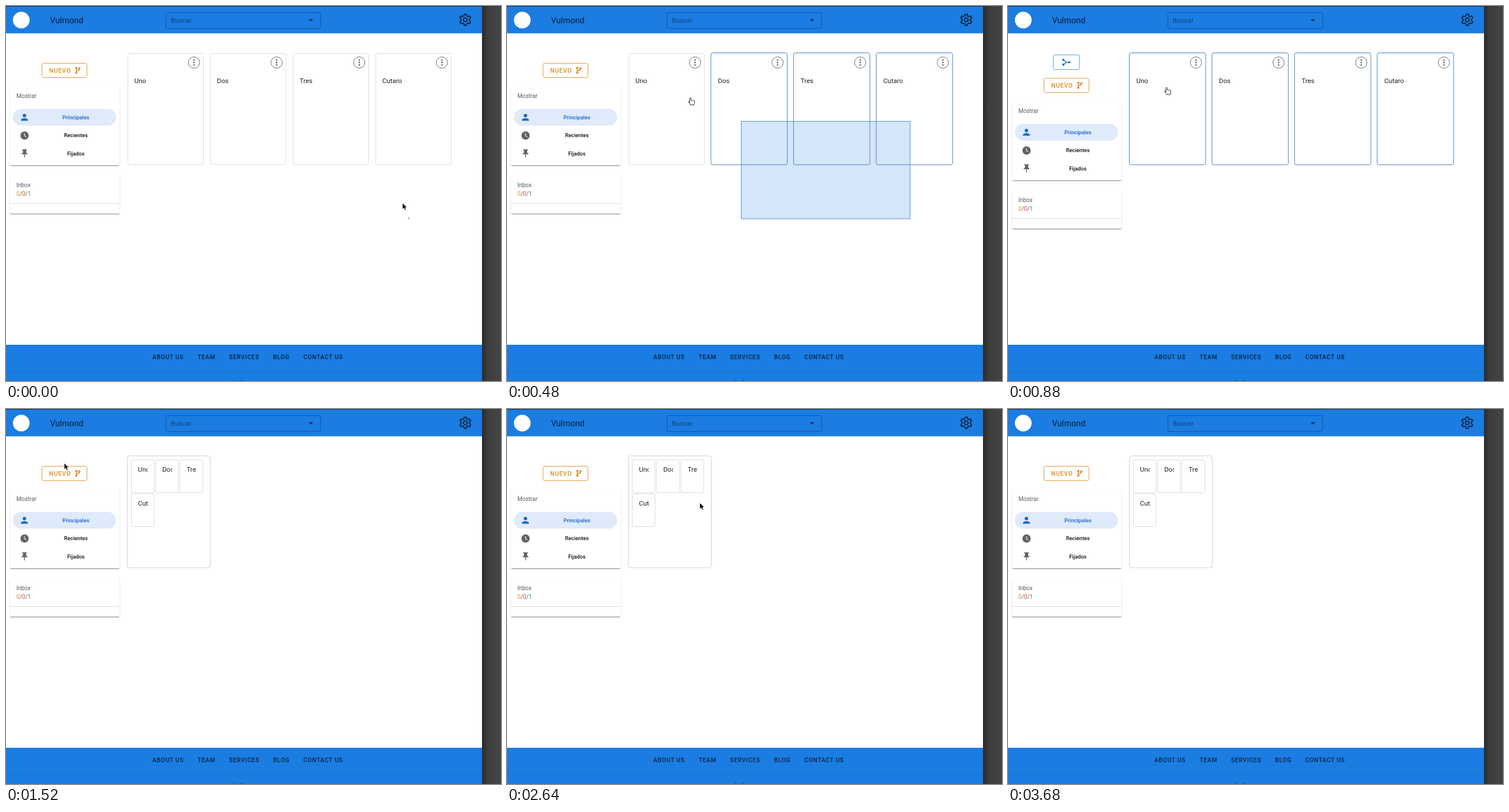
An HTML page that plays this animation: 859x652 px, repeating every 3760 ms.

```html
<!DOCTYPE html>
<html lang="es">
<head>
<meta charset="utf-8">
<title>Vulmond</title>
<style>
html, body { margin: 0; width: 859px; height: 652px; overflow: hidden; background: #fff; }
svg { position: absolute; left: 0; top: 0; font-family: Roboto, sans-serif; }
.paper { position: absolute; left: 6.5px; width: 190px; background: #fff; border-radius: 2px;
  box-shadow: 0 2px 1px -1px rgba(0,0,0,.28), 0 1px 1px rgba(0,0,0,.18), 0 1px 3px rgba(0,0,0,.14); }
#side { position: absolute; left: 0; top: 0; }
.soft { font-size: 10px; fill: #5c5c5c; }
.item { font-size: 9.3px; font-weight: 500; text-anchor: middle; fill: #111; }
.name { font-size: 11.5px; fill: #1d1d1d; }
.nav { font-size: 10.2px; font-weight: 500; letter-spacing: .8px; fill: #0c2340; }
.card { fill: #fff; stroke: #dcdcdc; }
.card.on { stroke: #4680c4; }
.kebab circle { fill: #555; }
.kebab .ring { fill: none; stroke: #686868; }
</style>
</head>
<body>
<svg width="859" height="652">
  <defs>
    <linearGradient id="edge">
      <stop offset="0" stop-color="#2b2b2b"/>
      <stop offset=".3" stop-color="#3d3d3d"/>
      <stop offset="1" stop-color="#444"/>
    </linearGradient>
  </defs>
  <rect width="826" height="47.5" fill="#1b7ce1"/>
  <rect width="826" height="1" fill="#0e2f55"/>
  <rect y="589" width="826" height="63" fill="#1b7ce1"/>
  <rect y="635" width="826" height="1" fill="#186dc6"/>
  <path d="M395 651h3M407 651h4" stroke="#12467d"/>
  <rect x="826" width="33" height="652" fill="url(#edge)"/>

  <circle cx="26.5" cy="24.5" r="14.5" fill="#fff"/>
  <text x="76.5" y="29.5" font-size="14.4" letter-spacing=".1" fill="#0a1d35">Vulmond</text>
  <rect x="277.5" y="11.5" width="268.5" height="27.5" rx="3" fill="none" stroke="#125397"/>
  <text x="286" y="29" font-size="11.3" letter-spacing=".2" fill="#103f74">Buscar</text>
  <path d="M525 23h8l-4 4.2z" fill="#0e3461"/>
  <g transform="translate(797 24) scale(1.083)" fill="none" stroke="#0c2848" stroke-width="1.9">
    <path id="gear" stroke-linejoin="round"/>
    <circle r="3"/>
  </g>
  <g id="nav" class="nav"></g>
  <g id="cards"></g>
  <g id="group">
    <rect x="210.5" y="81.5" width="144" height="194.5" rx="4" fill="#fff" stroke="#d0d0d0"/>
  </g>
  <g id="merge" fill="#1f72cc" stroke="#1f72cc">
    <rect x="78.5" y="85" width="45.5" height="25.5" rx="3" fill="none" stroke="#5b96d8"/>
    <path d="M96 93.5l5 4.3-5 4.3M101 97.8h5" fill="none" stroke-width="1.5"/>
    <g stroke="none">
      <circle cx="96" cy="93.5" r="1.9"/><circle cx="96" cy="102" r="1.9"/><circle cx="106.3" cy="97.8" r="1.9"/>
    </g>
  </g>
</svg>

<div id="side">
  <div class="paper" style="top:139px;height:138px"></div>
  <div class="paper" style="top:294px;height:67px"></div>
  <svg width="200" height="400">
    <rect x="62.5" y="99.5" width="78" height="25" rx="3" fill="none" stroke="#e09a3c"/>
    <text x="75" y="115.7" font-size="10.4" font-weight="500" letter-spacing=".75" fill="#df8a1c">NUEVO</text>
    <g fill="none" stroke="#df8a1c" stroke-width="1.5">
      <path d="M122 109v6M122 114q0-1.5 2-1.7 3.200-.3 3.200-3"/>
      <circle cx="122" cy="107.800" r="1.300"/><circle cx="122" cy="116" r="1.300"/><circle cx="127.200" cy="108.600" r="1.300"/>
    </g>
    <text class="soft" x="18" y="160">Mostrar</text>
    <rect x="12" y="179" width="179" height="29" rx="14.500" fill="#dfeafa"/>
    <path transform="translate(23 184.500) scale(.75)" fill="#1a69c6" d="M12 12a4 4 0 1 0 0-8 4 4 0 0 0 0 8zm0 2c-2.670 0-8 1.340-8 4v2h16v-2c0-2.660-5.330-4-8-4z"/>
    <circle cx="32.200" cy="225.200" r="7.200" fill="#636363"/>
    <path d="M32 221v4.500l3.200 2" fill="none" stroke="#fff" stroke-width="1.100"/>
    <path transform="translate(23.700 247.800) scale(.71)" fill="#636363" d="M16 9V4h1a1 1 0 0 0 0-2H7a1 1 0 0 0 0 2h1v5a3 3 0 0 1-3 3v2h6v7l1 1 1-1v-7h6v-2a3 3 0 0 1-3-3z"/>
    <text class="item" x="121.300" y="196.800" style="fill:#1a66c2">Principales</text>
    <text class="item" x="121.300" y="228.300">Recientes</text>
    <text class="item" x="121.300" y="260">Fijados</text>
    <text class="soft" x="18" y="315">Inbox</text>
    <text class="soft" x="18" y="329.700"><tspan fill="#dd8f22">0</tspan>/<tspan fill="#cf4a40">0</tspan>/<tspan fill="#36994b">1</tspan></text>
    <path d="M6.500 343.500h190" stroke="#dcdcdc"/>
  </svg>
</div>

<svg width="859" height="652">
  <rect id="sel" fill="#2e7de6" fill-opacity=".2" stroke="#5a8fcb"/>
  <path id="arrow" d="M0 0v11l2.600-2.300 1.900 4.100 2-.9-1.900-3.900h3.400z" fill="#000" stroke="#fff" stroke-width=".8"/>
  <path id="hand" d="M-1 8V1.100a1.100 1.100 0 0 1 2.200 0V4.600a1.200 1.200 0 0 1 2.200.2 1.200 1.200 0 0 1 2.100.5 1.100 1.100 0 0 1 2 .7v3q0 1.500-1 2.300V12.500H.2V11.300L-3 7.600a1 1 0 0 1 1.500-1.300z" fill="#fff" stroke="#222" stroke-width="1"/>
</svg>

<script>
const LOOP = 3760, STEP = 80;
const GROUPED = 1360, RELEASED = 880, HIDDEN = 3280;
const NAMES = ['Uno', 'Dos', 'Tres', 'Cutaro'];
const START = { x: 699.5, y: 370 };

// pointer path: time, x, y
const PATH = [
  [-80, 699, 368], [0, 688, 342.5], [160, 627, 298], [320, 492, 239], [400, 406.5, 200.5],
  [480, 318, 159.5], [560, 291, 148], [640, 285.5, 146], [800, 285.5, 146], [880, 275, 141.5],
  [1120, 125, 100], [1200, 101, 94], [1600, 101, 94], [1920, 220, 128], [2240, 334.5, 163]
];

const $ = id => document.getElementById(id);
const show = (el, on) => el.style.display = on ? '' : 'none';
const move = (el, x, y) => el.style.transform = `translate(${x}px, ${y}px)`;
const cardX = i => 211 + 143.4 * i;

$('gear').setAttribute('d', 'M' + Array.from({ length: 6 }, (_, i) =>
  [[-22.5, 6.6], [-10, 9.2], [10, 9.2], [22.5, 6.6]].map(([a, r]) => {
    const t = (a + i * 60) * Math.PI / 180;
    return `${(r * Math.sin(t)).toFixed(2)} ${(-r * Math.cos(t)).toFixed(2)}`;
  }).join('L')).join('L') + 'Z');

$('nav').innerHTML = [['ABOUT US', 254], ['TEAM', 332.5], ['SERVICES', 387], ['BLOG', 463.5], ['CONTACT US', 516]]
  .map(([label, x]) => `<text x="${x}" y="614.3">${label}</text>`).join('');

$('cards').innerHTML = NAMES.map((name, i) => `<g transform="translate(${cardX(i)} 82)">
  <rect class="card" rx="3"/>
  <text class="name" x="11.7" y="51.5">${name}</text>
  <g class="kebab" transform="translate(115.2 16.3)"><circle class="ring" r="9.8"/>
  <circle cy="-4.2" r="1.3"/><circle r="1.3"/><circle cy="4.2" r="1.3"/></g></g>`).join('');

$('group').innerHTML += NAMES.map((name, i) => {
  const x = 217.5 + 42.2 * (i % 3), y = i < 3 ? 88.5 : 147.5;
  return `<rect class="card" x="${x}" y="${y}" width="39.5" height="57" rx="2"/>
  <svg x="${x + 11.5}" y="${y}" width="16.8" height="57" overflow="hidden"><text class="name" y="20">${name}</text></svg>`;
}).join('');

const frames = [...document.querySelectorAll('#cards .card')];

function setBox(el, x, y, w, h) {
  Object.entries({ x, y, width: w, height: h }).forEach(([k, v]) => el.setAttribute(k, v));
}

function pointer(t) {
  const i = PATH.findIndex(p => p[0] > t);
  if (i < 0) return PATH.at(-1).slice(1);
  const [a, b] = [PATH[i - 1] || PATH[0], PATH[i]];
  const k = (t - a[0]) / (b[0] - a[0]);
  return [a[1] + (b[1] - a[1]) * k, a[2] + (b[2] - a[2]) * k];
}

function draw(now) {
  const t = Math.floor(now % LOOP / STEP) * STEP;
  const [x, y] = pointer(t);
  // the marquee trails the pointer by one step
  const [sx, sy] = pointer(Math.min(t, 800) - STEP);
  const dragging = t < RELEASED, grouped = t >= GROUPED;
  const merging = !dragging && !grouped;

  show($('sel'), dragging);
  setBox($('sel'), sx, sy, Math.max(0, START.x - sx), START.y - sy);
  show($('cards'), !grouped);
  show($('group'), grouped);
  show($('merge'), merging);
  move($('side'), 0, merging ? 26 : 0);

  frames.forEach((f, i) => {
    const on = sy < 275.5 && sx < cardX(i) + 131.5;
    f.classList.toggle('on', on);
    if (on) setBox(f, -.5, -.5, 132.5, 194.5);
    else setBox(f, .5, .5, 131, 193);
  });

  const overCard = y > 82 && y < 275 && NAMES.some((_, i) => x > cardX(i) && x < cardX(i) + 131);
  const overMerge = merging && x > 78 && x < 124 && y > 85 && y < 110;
  const inMarquee = dragging && x >= sx && y >= sy;
  const hand = !grouped && !inMarquee && (overCard || overMerge);
  show($('hand'), hand);
  show($('arrow'), !hand && t < HIDDEN);
  move($('hand'), x, y);
  move($('arrow'), x, y);
}

function tick() {
  draw(performance.now());
  requestAnimationFrame(tick);
}
tick();
</script>
</body>
</html>
```
